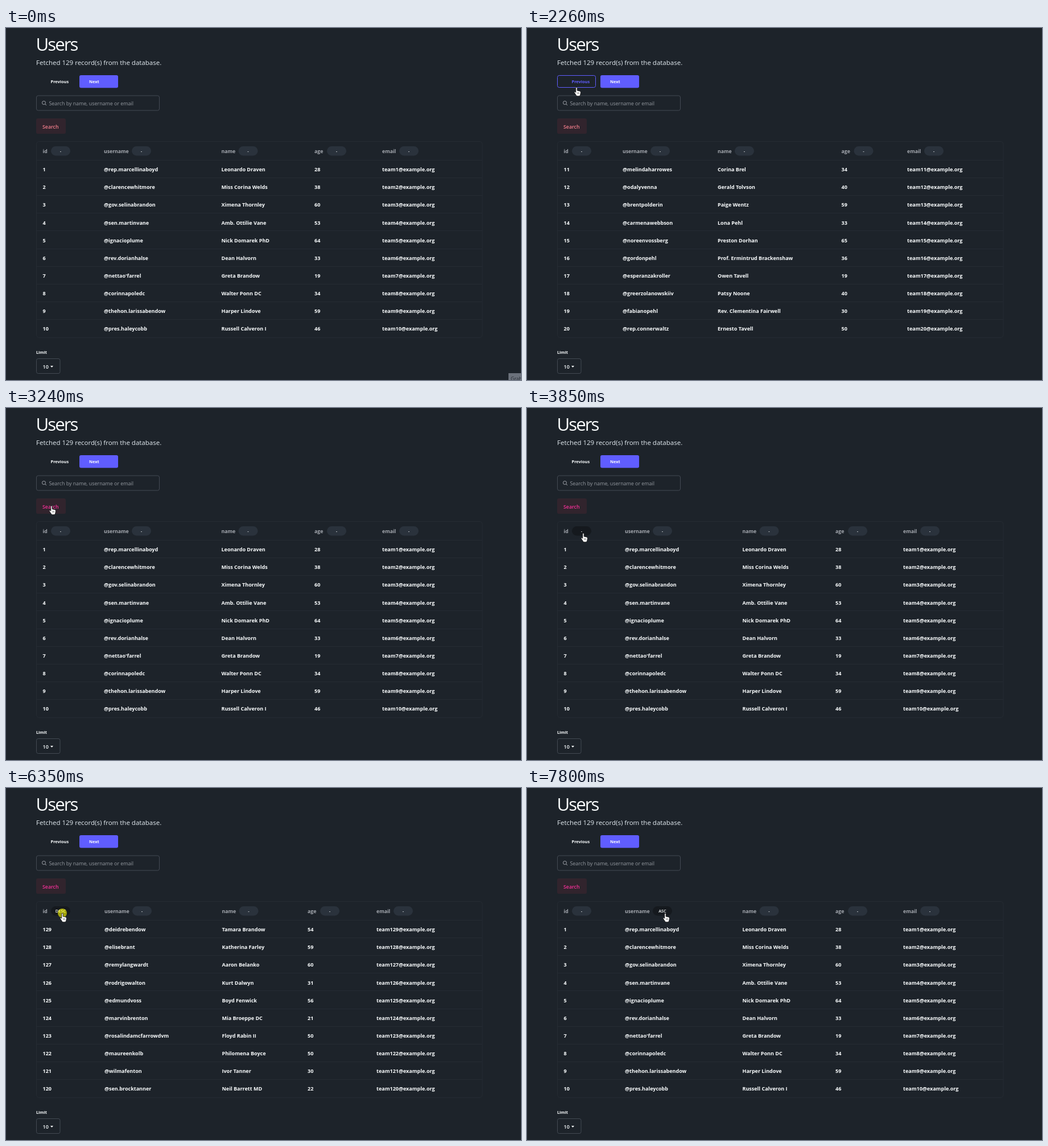
Write an HTML page that moves like this. It is 905 px wide and 619 px high and loops after 8000 ms.

```html
<!DOCTYPE html>
<html lang="en">
<head>
<meta charset="utf-8">
<title>Users</title>
<style>
html, body { margin: 0; width: 100%; height: 100%; overflow: hidden; background: #1d232a; }
svg { display: block; font-family: "Open Sans", "Noto Sans", sans-serif; }
</style>
</head>
<body>
<svg id="stage" width="905" height="619" viewBox="0 0 905 619"></svg>
<script>
const LOOP = 8000;
const INK = '#fbfeff', MUTED = '#a5a9b0', EDGE = '#434a53', LINE = '#252b33', PRIMARY = '#605dff', HOVER = '#5853e6';
const HEADERS = ['id', 'username', 'name', 'age', 'email'];
const PILL_GAPS = [14.5, 49, 30, 22, 30];

const PAGES = [
  { first: 1, step: 1, cols: [64.5, 172, 378.5, 542, 661], rows: `
rep.marcellinaboyd|Leonardo Draven|28
clarencewhitmore|Miss Corina Welds|38
gov.selinabrandon|Ximena Thornley|60
sen.martinvane|Amb. Ottilie Vane|53
ignacioplume|Nick Domarek PhD|64
rev.dorianhalse|Dean Halvorn|33
nettao'farrel|Greta Brandow|19
corinnapoledc|Walter Ponn DC|34
thehon.larissabendow|Harper Lindove|59
pres.haleycobb|Russell Calveron I|46` },
  { first: 11, step: 1, cols: [64.5, 168, 335, 552.5, 668], rows: `
melindaharrowes|Corina Brel|34
odalyvenna|Gerald Tolvson|40
brentpolderin|Paige Wentz|59
carmenawebbson|Lona Pehl|33
noreenvossberg|Preston Dorhan|65
gordonpehl|Prof. Ermintrud Brackenshaw|36
esperanzakroller|Owen Tavell|19
greerzolanowskiiv|Patsy Noone|40
fabianopehl|Rev. Clementina Fairwell|30
rep.connerwaltz|Ernesto Tavell|50` },
  { first: 129, step: -1, cols: [64.5, 173, 379.5, 530, 651], rows: `
deidrebendow|Tamara Brandow|54
elisebrant|Katherina Farley|59
remylangwardt|Aaron Belanko|60
rodrigowalton|Kurt Dalwyn|31
edmundvoss|Boyd Fenwick|56
marvinbrenton|Mia Broeppe DC|21
rosalindamcfarrowdvm|Floyd Rabin II|50
maureenkolb|Philomena Boyce|50
wilmafenton|Ivor Tanner|30
sen.brocktanner|Neil Barrett MD|22` },
];

// Step values: [start time, value]
const PAGE_AT = [[0, 0], [1580, 1], [3020, 0], [5540, 2], [6630, 0]];
const ID_SORT = [[0, '-'], [4330, 'ASC'], [5540, 'DESC'], [6630, '-']];
const NAME_SORT = [[0, '-'], [7800, 'ASC']];
const CLICKS = [[1270, 1400], [2640, 2740], [3970, 4120], [5190, 5330], [6350, 6420], [7670, 7740]];
const PATH = [
  [260, 558, 507], [1040, 156, 97], [1240, 155, 98], [1640, 155, 98], [1910, 110, 100],
  [2260, 87, 104], [2600, 83, 100], [2810, 83, 100], [2950, 78, 103], [3250, 80, 172],
  [3580, 140, 250], [3780, 99, 220], [6630, 99, 220], [7400, 240, 221], [7470, 243, 220],
];

const stepAt = (steps, t) => steps.filter(s => s[0] <= t).pop()[1];
const during = (t, [from, to]) => t >= from && t < to;

function pointerAt(t) {
  const i = PATH.findIndex(p => p[0] > t);
  if (i < 0) return PATH[PATH.length - 1].slice(1);
  const [t0, x0, y0] = PATH[i - 1], [t1, x1, y1] = PATH[i];
  const k = (t - t0) / (t1 - t0), e = k * k * (3 - 2 * k);
  return [x0 + (x1 - x0) * e, y0 + (y1 - y0) * e];
}

const text = (x, y, size, s, fill = INK, weight = 400, extra = '') =>
  `<text x="${x}" y="${y}" font-size="${size}" font-weight="${weight}" fill="${fill}" ${extra}>${s}</text>`;
const rect = (x, y, w, h, r, fill, stroke = 'none') =>
  `<rect x="${x}" y="${y}" width="${w}" height="${h}" rx="${r}" fill="${fill}" stroke="${stroke}"/>`;
const solidButton = (x, fill) =>
  rect(x, 83.5, 68, 22, 3, '#4341a8') + rect(x, 83, 68, 22, 3, fill);

function header(t, over) {
  const page = PAGES[stepAt(PAGE_AT, t)];
  return HEADERS.map((name, i) => {
    const x = page.cols[i], px = x + PILL_GAPS[i];
    const label = i === 0 ? stepAt(ID_SORT, t) : i === 1 ? stepAt(NAME_SORT, t) : '-';
    const fill = over(px, 208, 34, 17) ? '#15191e' : '#2a323c';
    return text(x, 220, 8.7, name, MUTED, 700) + rect(px, 208, 34, 16.5, 8.2, fill) +
      text(px + 17, 219.2, 7.4, label, INK, 600, 'text-anchor="middle"');
  }).join('');
}

function body(page) {
  return page.rows.trim().split('\n').map((row, i) => {
    const id = page.first + i * page.step, [user, name, age] = row.split('|');
    const y = 252.2 + i * 31.11, line = Math.round(233 + i * 31.11) - .5;
    return `<path d="M54 ${line}H837" stroke="${LINE}"/>` +
      [id, '@' + user, name, age, `team${id}@example.org`]
        .map((cell, c) => text(page.cols[c], y, 9, cell, INK, 700)).join('');
  }).join('');
}

function cursor(x, y, hand) {
  const shape = hand
    ? 'M-1.2 1.5Q-1.2 0 0 0T1.2 1.5V6l4.6.9q1.6.4 1.6 2l-.6 4.2q-.3 2.2-2.2 2.7H1.4Q0 15.5-.7 14.2l-3-4.6q-.5-1.3.5-1.6 1 0 2 1.4z'
    : 'M0 0v12l2.8-2.6 1.9 4.4 1.9-.9-1.9-4.2h3.8z';
  const folds = hand ? '<path d="M2 9v3M4 9v3" stroke-width=".6"/>' : '';
  return `<g transform="translate(${x.toFixed(1)} ${y.toFixed(1)})" fill="#fff" stroke="#111" stroke-width=".8">` +
    `<path d="${shape}"/>${folds}</g>`;
}

function draw(t) {
  const pageIndex = stepAt(PAGE_AT, t), visible = t >= PATH[0][0];
  const [x, y] = visible ? pointerAt(t) : [-99, -99];
  const over = (bx, by, w, h) => x >= bx && x <= bx + w && y >= by && y <= by + h;

  const onNext = over(129, 83, 68, 22), onPrevious = over(53, 83, 68, 22);
  const filled = during(t, [2330, 3020]), waiting = during(t, [2810, 3020]);
  const cols = PAGES[pageIndex].cols;
  const onPill = cols.some((cx, i) => over(cx + PILL_GAPS[i], 208, 34, 17));
  const hand = onNext || (onPrevious && pageIndex === 1 && !waiting) || over(53, 159, 52, 27) || onPill;

  let previous = '', previousInk = INK;
  if (filled) previous = solidButton(53, HOVER);
  else if (pageIndex === 1) {
    previous = rect(53.5, 83.5, 67, 21, 3, 'none', PRIMARY);
    previousInk = PRIMARY;
  }

  return text(52.4, 39.6, 31.2, 'Users', INK, 400, 'letter-spacing="-1.9"') +
    text(53, 65, 11.5, 'Fetched 129 record(s) from the database.', '#e4ecf2') +
    previous + text(78.5, 97.3, 7.4, 'Previous', previousInk, 700) +
    solidButton(129, onNext ? HOVER : PRIMARY) + text(146, 97.3, 7.4, 'Next', INK, 700) +
    rect(53.5, 119, 216, 26, 3, 'none', EDGE) +
    `<path d="M69 134l2 2M69.5 131.5a3 3 0 1 1-6 0a3 3 0 1 1 6 0" fill="none" stroke="${MUTED}"/>` +
    text(75.5, 135.7, 8.9, 'Search by name, username or email', '#959aa1') +
    rect(53, 159, 52, 27, 3, '#31242d') +
    text(64, 176.6, 8.8, 'Search', t < 3200 ? '#f27e8c' : '#f43098', 600) +
    rect(53.5, 199.5, 783.5, 345, 5, 'none', LINE) +
    header(t, over) + body(PAGES[pageIndex]) +
    text(53, 573, 7.3, 'Limit', INK, 700) +
    rect(53.5, 581.5, 41.5, 26, 3, 'none', EDGE) + text(64.5, 598.5, 9, '10', INK, 600) +
    `<path d="M78 594h5l-2.5 3z" fill="${INK}"/>` +
    (t < 70 ? rect(883, 607, 23, 13, 0, '#6b717b') + text(887, 620, 8.5, 'Grab', '#252b33') : '') +
    (CLICKS.some(c => during(t, c)) ? `<circle cx="${x}" cy="${y}" r="8" fill="#ff0" opacity=".6"/>` : '') +
    (visible ? cursor(x, y, hand) : '');
}

const stage = document.getElementById('stage');
const start = performance.now();
let shown = '';
function tick() {
  const markup = draw((performance.now() - start) % LOOP);
  if (markup !== shown) stage.innerHTML = shown = markup;
  requestAnimationFrame(tick);
}
tick();
</script>
</body>
</html>
```
